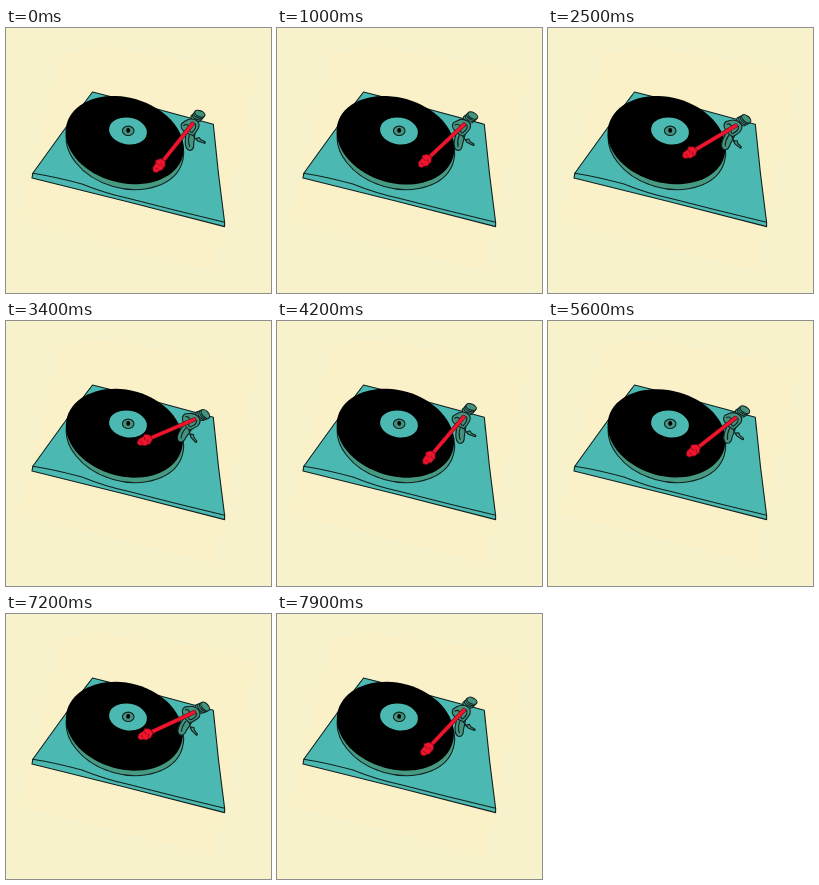
These frames come from a looping animation (265 px wide and 265 px high, 8 s). An HTML page:

```html
<!DOCTYPE html>
<html lang="en">
<head>
<meta charset="utf-8">
<title>Turntable</title>
<style>
  html, body { margin: 0; width: 100%; height: 100%; overflow: hidden; background: #f7f2cc; }
  svg { display: block; width: 100%; height: 100%; }
  .ink { stroke: #10211f; stroke-width: 1.1; stroke-linejoin: round; stroke-linecap: round; }
  .teal { fill: #4bb9b1; }
  .green { fill: #43937f; }
  .red { fill: #f0142d; }
  .line { fill: none; }
</style>
</head>
<body>
<svg viewBox="0 0 265 265">
  <!-- warm patch of paper -->
  <path fill="#faf1c9" d="M55 25 L95 18 L205 35 L250 48 L208 243 L12 192Z"/>

  <!-- plinth -->
  <path class="ink teal" d="M86.5 64 Q121 72.5 160 83.5 L207.3 96.3 Q212 146 218.6 194.3 L218.6 198.6 Q122 173.5 26 150 L26.8 145.3 Q56 104 86.5 64Z"/>
  <path class="ink line" d="M26.8 145.3 Q50 149 76 156 Q98 165 122 170.3 Q171 183 218.6 194.3"/>

  <!-- platter and record -->
  <ellipse class="ink" fill="#479a82" cx="118.9" cy="117.3" rx="59.8" ry="42.8" transform="rotate(16 118.9 117.3)"/>
  <path id="record" fill="#000"/>
  <ellipse class="teal" cx="122" cy="103" rx="19" ry="13.3" transform="rotate(9 122 103)"/>
  <ellipse class="ink green" cx="122.2" cy="102.8" rx="5.8" ry="4.7" stroke-width=".8"/>
  <ellipse cx="122.2" cy="102.4" rx="1.9" ry="2.3"/>

  <!-- tonearm -->
  <g transform="translate(-.8 .5)">
    <g id="arm">
      <path class="ink green" d="M181 101 L180 113 Q180 121 184.5 122 Q189 121.5 188.5 115 L190 103Z"/>
      <path class="ink line" d="M184 107 Q182.5 113 184.5 118"/>
      <path class="ink line" d="M187 106 L191 111 L200 114.5" stroke-width="1.3"/>
      <path class="ink green" d="M191 110 L194 109 L195.5 111.3 L200 113.3 L199.4 114.8 L192.5 112.5Z"/>
      <path class="ink line" d="M186 97 L191 90" stroke-width="4"/>
      <g id="weight"></g>
      <path class="ink green" d="M180 92.5 Q185 89 190.5 91.5 Q195 94 193.5 99 Q191 104 188 107 Q182 105.5 178.5 102.5 Q174.5 99 176.5 95Z"/>
      <path class="ink line" d="M190 95 Q192 99 187 104 M178.5 97 Q181 95 183 97 M180 102 Q184 100 186 104"/>
      <path d="M187.3 95.4 L156.3 134.2" stroke="#4d0c18" stroke-width="4.4" stroke-linecap="round"/>
      <path d="M187.3 95.4 L156.3 134.2" stroke="#f0142d" stroke-width="3.4" stroke-linecap="round"/>
      <path class="red" stroke="#5a0815" stroke-width=".7" stroke-linejoin="round" d="M155.3 130 L150.2 132 L150.6 134.5 L149 137 L147.6 139 L148 143.2 L151.5 144.2 L154 142.4 L157 141.6 L158.4 139 L160 137.8 L160 132.5Z"/>
      <path fill="none" stroke="#7a0a19" stroke-width=".7" d="M151.5 134.5 L154.2 137 M150 139.5 L153.2 141 M156 135 L157.5 138"/>
    </g>
  </g>
</svg>
<script>
const LOOP = 4000, STEP = 100;
const PIVOT = "183 100";
const byId = id => document.getElementById(id);
const record = byId("record"), arm = byId("arm");

// stacked discs of the counterweight
byId("weight").innerHTML = [[190.8, 89.6], [192.4, 88], [193.6, 86.5], [194.6, 85.2]]
  .map(([x, y]) => `<ellipse class="ink green" cx="${x}" cy="${y}" rx="5.4" ry="3" transform="rotate(20 ${x} ${y})"/>`)
  .join("");

// slightly uneven disc turning in a tilted plane
function discPath(turn) {
  const tilt = 16 * Math.PI / 180, c = Math.cos(tilt), s = Math.sin(tilt);
  const points = [];
  for (let i = 0; i < 72; i++) {
    const a = i / 72 * 2 * Math.PI;
    const k = 1 + 0.006 * Math.cos(2 * (a - turn)) + 0.003 * Math.cos(3 * (a - turn));
    const x = 59.9 * k * Math.cos(a), y = 42.8 * k * Math.sin(a);
    points.push((118.5 + x * c - y * s).toFixed(2) + " " + (112.2 + x * s + y * c).toFixed(2));
  }
  return "M" + points.join("L") + "Z";
}

// slow drift inward, then a quick return
function armAngle(t) {
  return t <= 3600 ? t * 0.0083 : Math.max(0, 29.9 - (t - 3600) * 0.084);
}

function draw(time) {
  const t = Math.floor(time % LOOP / STEP) * STEP;
  record.setAttribute("d", discPath(Math.min(t, 3200) / 1800 * 2 * Math.PI));
  arm.setAttribute("transform", `rotate(${armAngle(t)} ${PIVOT})`);
}

const start = performance.now();
function tick() {
  draw(performance.now() - start);
  requestAnimationFrame(tick);
}
tick();
</script>
</body>
</html>
```
